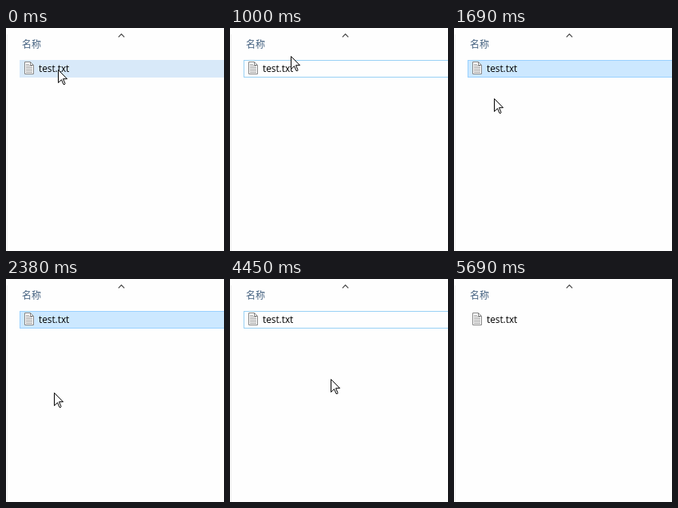
Animation, 273 px wide and 279 px high, one loop 5.79 s. Source, as an HTML page:

```html
<!DOCTYPE html>
<html lang="zh">
<head>
<meta charset="utf-8">
<title>File list</title>
<style>
  html, body { margin: 0; width: 100%; height: 100%; overflow: hidden; background: #fefefe; }
  svg { display: block; width: 100%; height: 100%; }
  .head { font: 12px "Noto Sans CJK SC", "Noto Sans CJK", sans-serif; fill: #43607f; }
  .name { font: 11.8px "Open Sans", "Noto Sans", sans-serif; fill: #000; }
</style>
</head>
<body>
<svg viewBox="0 0 273 279">
  <rect width="273" height="279" fill="#fefefe"/>
  <path d="M1.5 8V279" stroke="#f0f0f0"/>
  <path d="M140.8 11.3L144.5 7.6L148.2 11.3" fill="none" stroke="#404040" stroke-width="1.2"/>
  <text class="head" x="20" y="25">名称</text>
  <g id="file">
    <rect id="row" x="17.5" y="40.5" width="260" height="21"/>
    <path d="M23.5 42.5H30.5L34.5 46.5V57.5H23.5Z" fill="#fff" stroke="#858585"/>
    <path d="M30.5 42.5V46.5H34.5" fill="none" stroke="#858585"/>
    <path d="M25 45.5H29M25 47.5H33M25 49.5H33M25 51.5H33M25 53.5H33M25 55.5H33" stroke="#a2a2a2"/>
    <text class="name" x="41" y="55">test.txt</text>
  </g>
  <path id="cursor" d="M.5 .5V16.5L4.5 12.7L7 18.5H8.5L9 17.5L6.5 11.7H11.5Z" fill="#fff" stroke="#000"/>
</svg>
<script>
const LOOP = 5790, TICK = 139, LEAD = 9;

// Ticks at which the file's state changes
const FIRST_MOVE = 3, CLICK = 10, DELETE = 20, RESTORE = 32, LEAVE = 39, BLUR = 41;

const looks = {
  plain: ["none", "none"],
  hover: ["#d8e9f9", "#d8e9f9"],
  focus: ["none", "#99d1f5"],
  selected: ["#cce8ff", "#99d1ff"]
};

// Pointer strokes: each eases out from wherever the last one ended
const home = { x: 65, y: 52 };
const strokes = [
  { from: 2, to: 3, x: 67, y: 161 },
  { from: 3, to: 5, x: 76, y: 134 },
  { from: 5, to: 7, x: 76, y: 35 },
  { from: 7, to: 9, x: 50, y: 42 },
  { from: 9, to: 10, x: 47, y: 49 },
  { from: 11, to: 13, x: 50, y: 93 },
  { from: 15, to: 17, x: 60, y: 142 },
  { from: 19, to: 21, x: 126, y: 125 },
  { from: 34, to: 38, x: 213, y: 270 }
];

const byId = id => document.getElementById(id);
const file = byId("file"), row = byId("row"), cursor = byId("cursor");
const easeOut = p => 1 - (1 - p) ** 3;
const show = (el, on) => el.setAttribute("visibility", on ? "visible" : "hidden");

function pointerAt(tick) {
  let { x, y } = home;
  for (const s of strokes) {
    const p = Math.min(1, Math.max(0, (tick - s.from) / (s.to - s.from)));
    x += (s.x - x) * easeOut(p);
    y += (s.y - y) * easeOut(p);
  }
  return { x: Math.round(x), y: Math.round(y) };
}

function lookAt(tick, pointer) {
  if (tick >= BLUR) return looks.plain;
  if (tick >= CLICK && tick < DELETE) return looks.selected;
  if (pointer.y >= 40 && pointer.y < 62) return looks.hover;
  return tick >= FIRST_MOVE ? looks.focus : looks.plain;
}

function draw(t) {
  const tick = Math.floor((t + LEAD) / TICK);
  const pointer = pointerAt(tick);
  const [fill, stroke] = lookAt(tick, pointer);
  row.setAttribute("fill", fill);
  row.setAttribute("stroke", stroke);
  show(file, tick < DELETE || tick >= RESTORE);
  show(cursor, tick < LEAVE);
  cursor.setAttribute("transform", `translate(${pointer.x} ${pointer.y})`);
}

const start = performance.now();
function frame() {
  draw((performance.now() - start) % LOOP);
  requestAnimationFrame(frame);
}
frame();
</script>
</body>
</html>
```
